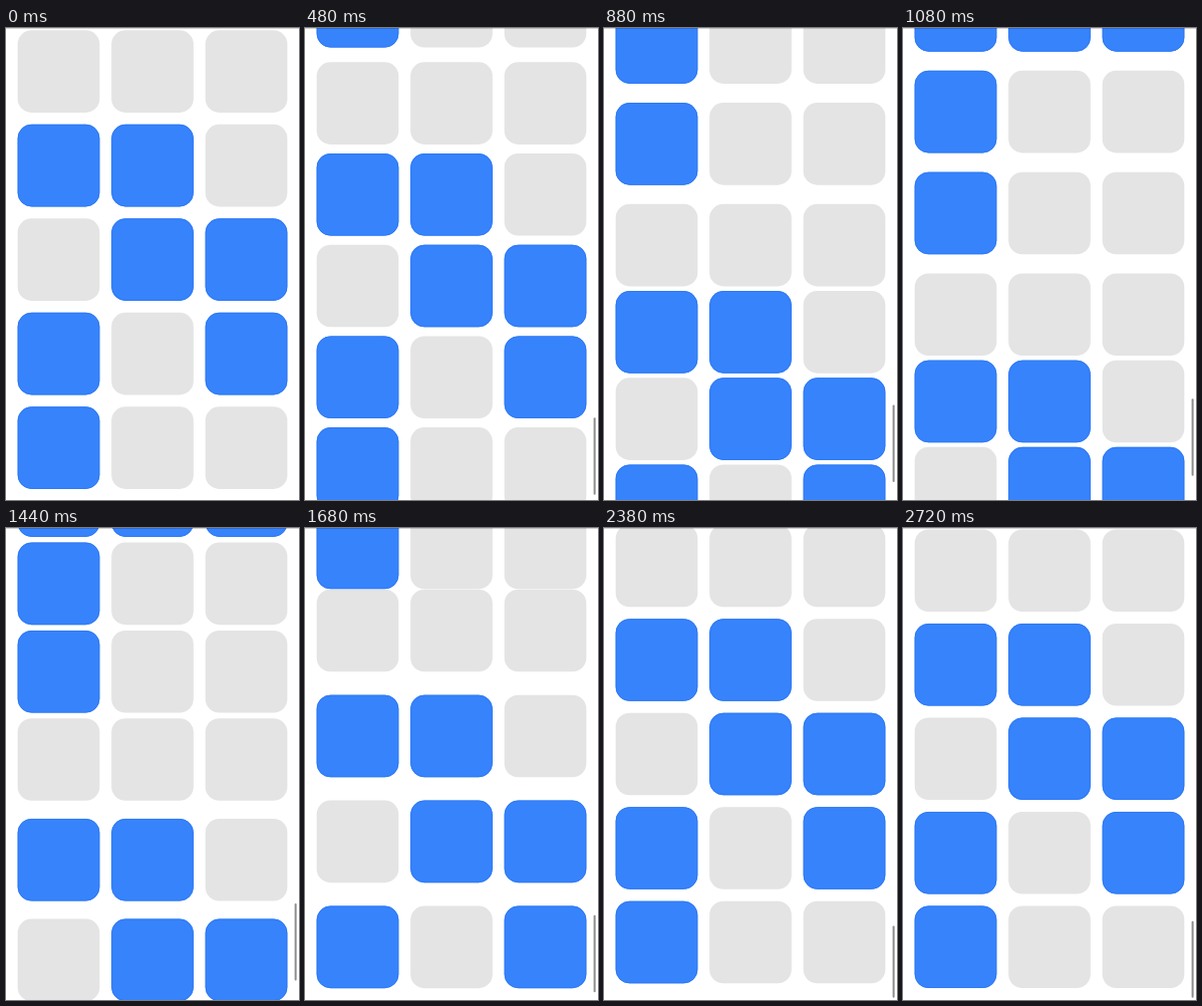
Recreate the animation shown at these times as an HTML page with a canvas. Size 295x474 px, loop 2.74 s.

```html
<!DOCTYPE html>
<html>
<head>
<meta charset="utf-8">
<style>
html, body { margin: 0; width: 100%; height: 100%; overflow: hidden; background: #fff; }
canvas { display: block; }
</style>
</head>
<body>
<canvas></canvas>
<script>
const W = 295, H = 474, LOOP = 2740;
const SIZE = 82.6, PITCH = 94.5, REST = 2.3;
const ANCHOR = 3; // the row under the finger
const rows = ['111', '100', '100', '000', '110', '011', '101', '100'];

const PULL = { speed: .373, from: 230, to: 594 };    // finger moves down
const PUSH = { speed: -.913, from: 1011, to: 1443 }; // then turns upwards
const RELEASE = 1790, LAG = 100;

const canvas = document.querySelector('canvas');
const ctx = canvas.getContext('2d');
const ratio = window.devicePixelRatio || 1;
canvas.width = W * ratio;
canvas.height = H * ratio;
canvas.style.width = W + 'px';
canvas.style.height = H + 'px';
ctx.scale(ratio, ratio);

const clamp = x => Math.max(0, Math.min(1, x));
const ramp = (t, { from, to }) => clamp((t - from) / (to - from));

// Velocity grows linearly during a ramp and then stays; distance is its integral.
const velocity = (t, move) => move.speed * ramp(t, move);
const distance = (t, move) => move.speed *
  (ramp(t, move) ** 2 * (move.to - move.from) / 2 + Math.max(0, t - move.to));

function scrollOffset(t) {
  if (t < RELEASE) return distance(t, PULL) + distance(t, PUSH);
  const s = t - RELEASE; // critically damped bounce past the end
  return (PULL.speed + PUSH.speed) * s * Math.exp(-.00685 * s);
}

// Rows trail behind the finger, then relax once it lets go.
function stretch(t) {
  const relax = Math.exp(-Math.max(0, t - RELEASE) / 60);
  const v = (velocity(t, PULL) + velocity(t, PUSH)) * relax;
  return 18 * v + 11 * v ** 3;
}

function box(x, y, w, h, r, fill, edge) {
  ctx.beginPath();
  ctx.roundRect(x, y, w, h, r);
  ctx.fillStyle = fill;
  ctx.fill();
  if (!edge) return;
  ctx.beginPath();
  ctx.roundRect(x + .5, y + .5, w - 1, h - 1, r - .5);
  ctx.strokeStyle = edge;
  ctx.stroke();
}

function draw(t) {
  ctx.fillStyle = '#fff';
  ctx.fillRect(0, 0, W, H);

  const offset = scrollOffset(t), extra = stretch(t - LAG);
  rows.forEach((row, i) => {
    const n = i - ANCHOR;
    const y = REST + offset + n * PITCH - Math.abs(n) * extra;
    [...row].forEach((on, col) => {
      const colors = on === '1' ? ['#3783fc', '#2f7af2'] : ['#e4e4e4'];
      box(11.7 + col * PITCH, y, SIZE, SIZE, 14, ...colors);
    });
  });

  const barTop = 394 - offset * (offset > 0 ? .0895 : 1);
  const barEnd = Math.min(471.7, barTop + 77.5);
  ctx.globalAlpha = clamp((t - 140) / 120);
  box(290.6, barTop, 2, barEnd - barTop, 1, '#8c8c8c');
  ctx.globalAlpha = 1;

  ctx.fillStyle = 'rgba(0,0,0,.17)';
  ctx.fillRect(0, 0, W, 1);
}

const start = performance.now();
function frame() {
  const t = (performance.now() - start) % LOOP;
  draw(Math.floor(t / 20) * 20);
  requestAnimationFrame(frame);
}
frame();
</script>
</body>
</html>
```
